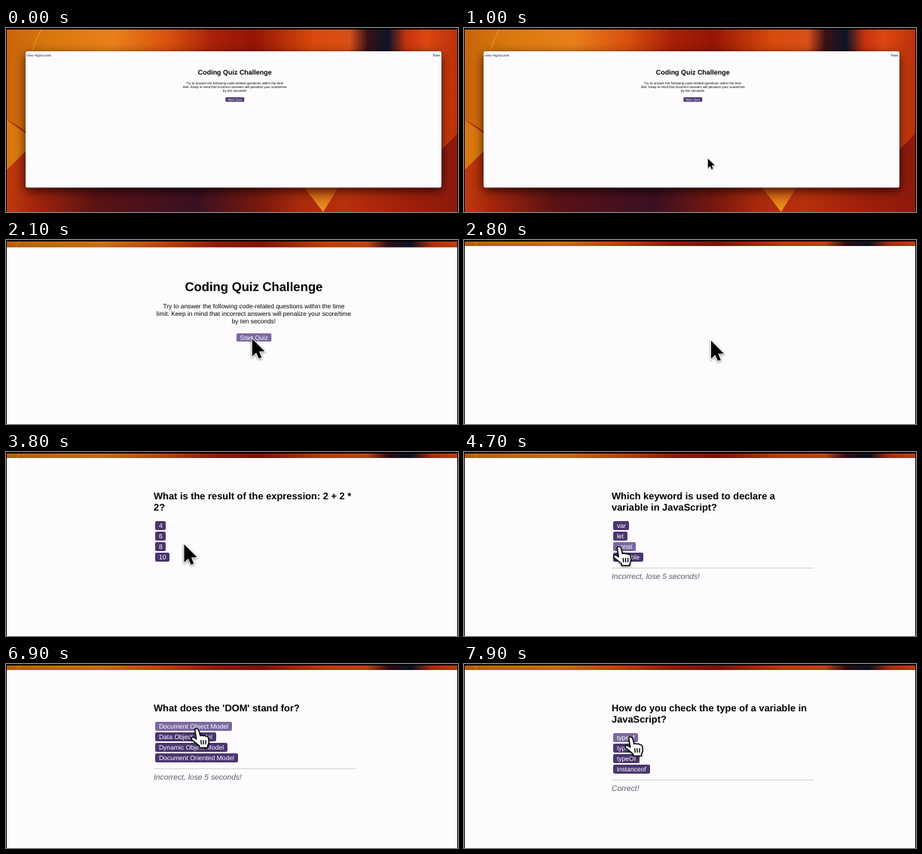
An HTML page for the animation above (8 s loop, 600 by 245 pixels).

```html
<!DOCTYPE html>
<html lang="en">
<head>
<meta charset="utf-8">
<title>Coding Quiz Challenge</title>
<style>
html, body { margin: 0; width: 100%; height: 100%; overflow: hidden; background: #000; }
body, text { font-family: "Liberation Sans", Arial, sans-serif; text-rendering: geometricPrecision; }
svg { position: absolute; left: 0; top: 0; }
.window { fill: #fdfbfe; filter: drop-shadow(0 4px 7px #000b); }
.btn { background: #4a3570; fill: #4a3570; }
.btn.hover { background: #7b68a3; fill: #7b68a3; }
#start text { font-size: 4.47px; }
#start .title { font-size: 8.95px; font-weight: bold; }
#quiz { position: absolute; left: 196px; top: 50.8px; width: 267px; }
#quiz h2 { margin: 0 0 11px; font: bold 12.85px/15px "Liberation Sans", Arial, sans-serif; color: #000; }
#quiz .btn { width: max-content; margin: 0 0 2px 2.3px; padding: 0 4.6px; border-radius: 2px;
  font-size: 8.58px; line-height: 12px; color: #fff; }
#quiz p { width: 268px; margin: 8.7px 0 0; padding-top: 4.5px; border-top: 1px solid #d2d0d4;
  font: italic 10.27px/14px "Liberation Sans", Arial, sans-serif; color: #5e5c62; }
#cursor { filter: drop-shadow(0 1.5px 1.5px #0007); }
</style>
</head>
<body>
<svg width="600" height="245">
  <defs>
    <linearGradient id="sky">
      <stop offset="0" stop-color="#c8640c"/><stop offset=".1" stop-color="#d9780e"/>
      <stop offset=".24" stop-color="#e8801a"/><stop offset=".36" stop-color="#d8500e"/>
      <stop offset=".46" stop-color="#a82008"/><stop offset=".55" stop-color="#941506"/>
      <stop offset=".68" stop-color="#d84a0c"/><stop offset=".76" stop-color="#d85018"/>
      <stop offset=".8" stop-color="#3a1018"/><stop offset=".845" stop-color="#0c1428"/>
      <stop offset=".885" stop-color="#c4320e"/><stop offset=".93" stop-color="#dd4812"/>
      <stop offset="1" stop-color="#b8300a"/>
    </linearGradient>
    <linearGradient id="ground">
      <stop offset="0" stop-color="#c03a0c"/><stop offset=".07" stop-color="#a0240c"/>
      <stop offset=".2" stop-color="#5a1214"/><stop offset=".42" stop-color="#3a1022"/>
      <stop offset=".56" stop-color="#7a180e"/><stop offset=".65" stop-color="#a82a0c"/>
      <stop offset=".75" stop-color="#b8300c"/><stop offset=".88" stop-color="#a0200c"/>
      <stop offset="1" stop-color="#8a1a0c"/>
    </linearGradient>
    <linearGradient id="glow" x2="0" y2="1">
      <stop offset="0" stop-color="#c8380c"/><stop offset="1" stop-color="#e8a020"/>
    </linearGradient>
  </defs>
  <g id="wallpaper">
    <rect width="600" height="245" fill="url(#sky)"/>
    <path d="M0 122Q20 130 40 150L560 180L600 140V245H0Z" fill="url(#ground)"/>
    <path d="M0 122L40 150L0 190Z" fill="#d8780f"/>
    <path d="M390 205H446L421 245Z" fill="url(#glow)"/>
    <path d="M48 0Q38 16 34 34" fill="none" stroke="#f0a830" stroke-width=".8"/>
  </g>
  <g id="camera">
    <rect class="window" x="26" y="31" width="552" height="181.5" rx="2.5"/>
    <g id="start">
      <text x="27" y="37.7" fill="#2c2248">View Highscores</text>
      <text x="577" y="37.7" text-anchor="end">Time:</text>
      <g text-anchor="middle">
        <text class="title" x="303.7" y="62.2">Coding Quiz Challenge</text>
        <text x="303.7" y="74.6">Try to answer the following code-related questions within the time</text>
        <text x="303.7" y="80">limit. Keep in mind that incorrect answers will penalize your score/time</text>
        <text x="303.7" y="85.4">by ten seconds!</text>
        <rect class="btn" x="291.4" y="92.2" width="24.8" height="6" rx="1"/>
        <text x="303.8" y="96.8" fill="#fff">Start Quiz</text>
      </g>
    </g>
  </g>
</svg>
<div id="quiz"></div>
<svg width="600" height="245">
  <path d="M0 0H600V245H599V2H1V245H0Z"/>
  <g id="cursor">
    <path id="arrow" transform="scale(1.5)" stroke="#fff" stroke-width="1.3" paint-order="stroke"
      d="M0 0V16L3.7 12.6L6 18L8.6 17L6.3 11.6L11.4 11.4Z"/>
    <g id="hand" transform="translate(-1 -1) scale(1.08)" stroke="#000" stroke-width="1.3" stroke-linecap="round" stroke-linejoin="round">
      <path fill="#fff" d="M-2 2Q-2 -.5 .5 0Q2.5 .5 3 3L4.5 9Q6 7.5 8 9Q10 7.8 11.5 9.8Q14 9.2 14.5 12L15 16Q15 19 13.5 21V23.5H3.5V21.5Q0 18 -5 14.5Q-7.5 12 -5.5 10.8Q-3 10 -.2 13Z"/>
      <path d="M5.3 14.5L5.8 19M8.2 14.5L8.5 19M11.2 14.5V19"/>
    </g>
  </g>
</svg>
<script>
const LOOP = 8000, ZOOM = 1.91, WALLPAPER_ZOOM = 1.13;
const $ = id => document.getElementById(id);

const START_HIDDEN = 2350;
const questions = [
  { at: 2950, title: "What is the result of the expression: 2 + 2 * 2?",
    options: ["4", "6", "8", "10"] },
  { at: 4600, title: "Which keyword is used to declare a variable in JavaScript?",
    options: ["var", "let", "const", "variable"], feedback: "Incorrect, lose 5 seconds!" },
  { at: 5750, title: "What does the 'DOM' stand for?",
    options: ["Document Object Model", "Data Object Model", "Dynamic Object Model", "Document Oriented Model"],
    feedback: "Incorrect, lose 5 seconds!" },
  { at: 7150, title: "How do you check the type of a variable in JavaScript?",
    options: ["typeof", "type of", "typeOf", "instanceof"], feedback: "Correct!" }
];

// Pointer stops: time, x, y in unzoomed page coordinates
const stops = [
  [0, 342, 250], [350, 342, 248], [400, 342, 241], [600, 342, 241], [1450, 302.4, 94.4],
  [1800, 302.4, 94.4], [2300, 302.6, 97], [2800, 302.6, 97], [3250, 288, 111.5],
  [3800, 254.7, 91.2], [4250, 239, 93.2], [4800, 239, 93.2], [5400, 241.4, 92.3],
  [5850, 241.4, 92.3], [6300, 256.5, 94.9], [6800, 263.9, 72.4], [7200, 263.9, 72.4],
  [7600, 250, 81.8], [7880, 247.1, 78.1], [8000, 247.1, 78.1]
];

const clamp = v => Math.min(1, Math.max(0, v));
const smooth = p => p * p * (3 - 2 * p);
const easeInOut = p => p < .5 ? 4 * p ** 3 : 1 - 4 * (1 - p) ** 3;

function pointerAt(t) {
  const i = Math.max(1, stops.findIndex(s => s[0] > t));
  const [t0, x0, y0] = stops[i - 1], [t1, x1, y1] = stops[i];
  const p = smooth((t - t0) / (t1 - t0));
  return [x0 + (x1 - x0) * p, y0 + (y1 - y0) * p];
}

function cameraAt(t) {
  const p = easeInOut(clamp((t - 1400) / 900));
  return { scale: 1 + (ZOOM - 1) * p, x: -250 * p, y: -51.2 * p ** 1.3 };
}

let shown;
function showQuestion(question) {
  if (question === shown) return;
  shown = question;
  const add = (tag, text, name = "") => {
    const el = document.createElement(tag);
    el.textContent = text;
    el.className = name;
    $("quiz").append(el);
  };
  $("quiz").replaceChildren();
  if (!question) return;
  add("h2", question.title);
  question.options.forEach(option => add("div", option, "btn"));
  if (question.feedback) add("p", question.feedback);
}

function hoverButtons(x, y) {
  let any = false;
  for (const button of document.querySelectorAll(".btn")) {
    const r = button.getBoundingClientRect();
    const over = x >= r.left && x <= r.right && y >= r.top && y <= r.bottom;
    button.classList.toggle("hover", over);
    any ||= over;
  }
  return any;
}

function render(t) {
  const cam = cameraAt(t);
  const back = Math.min(cam.scale, WALLPAPER_ZOOM);
  $("camera").setAttribute("transform", `translate(${cam.x} ${cam.y}) scale(${cam.scale})`);
  $("wallpaper").setAttribute("transform", `translate(${274 * (1 - back)} 0) scale(${back})`);
  $("start").style.display = t < START_HIDDEN ? "" : "none";
  showQuestion(questions.findLast(q => t >= q.at));

  const [px, py] = pointerAt(t);
  const x = cam.x + px * cam.scale, y = cam.y + py * cam.scale;
  const hand = hoverButtons(x, y) && Boolean(shown);
  $("cursor").setAttribute("transform", `translate(${x} ${y}) scale(${cam.scale / ZOOM})`);
  $("arrow").style.display = hand ? "none" : "";
  $("hand").style.display = hand ? "" : "none";
}

const begin = performance.now();
function tick() {
  render((performance.now() - begin) % LOOP);
  requestAnimationFrame(tick);
}
tick();
</script>
</body>
</html>
```
